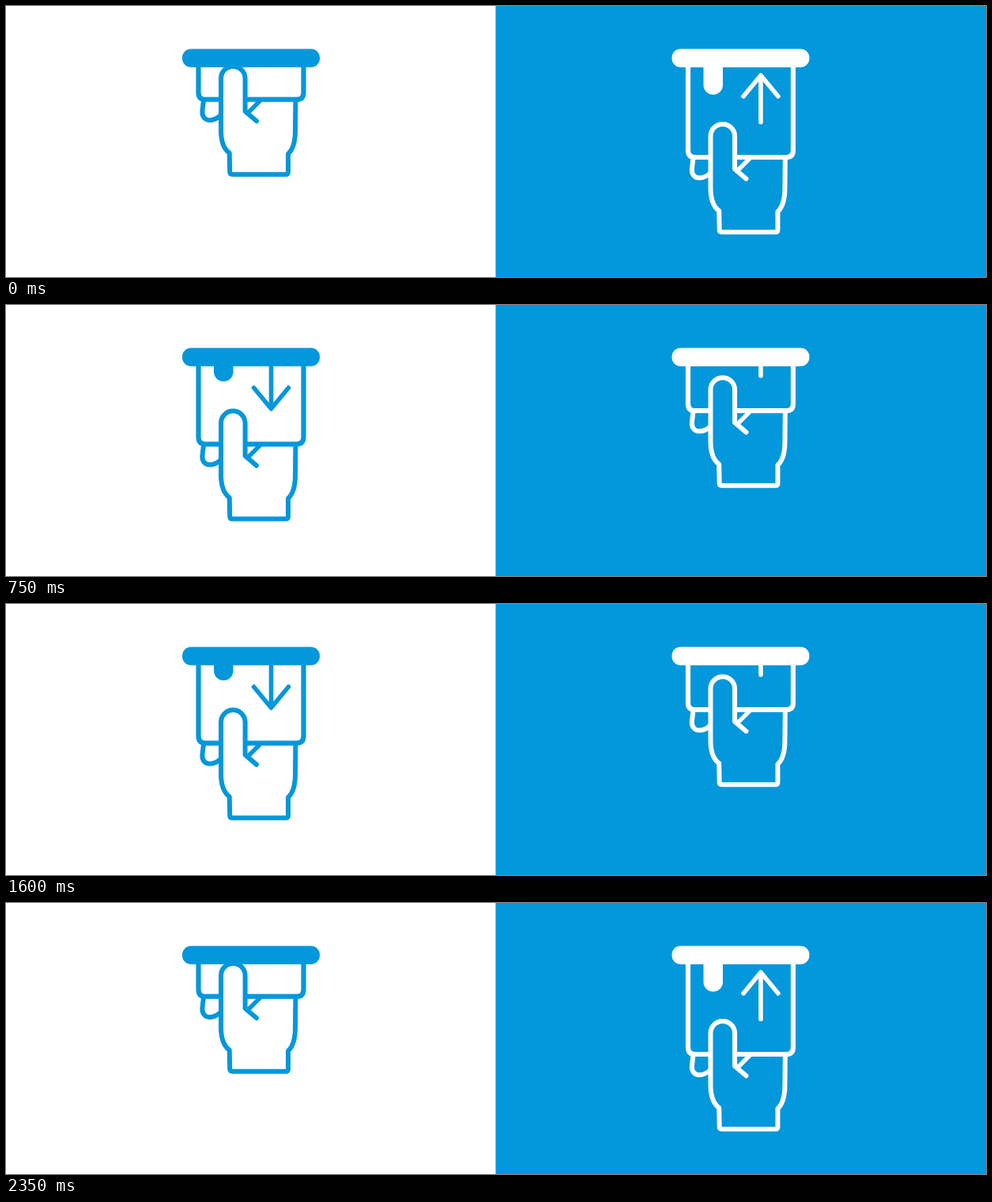
Write an HTML page with a canvas that moves like this. It is 1240 px wide and 344 px high and loops after 2400 ms.

```html
<!DOCTYPE html>
<html lang="en">
<head>
<meta charset="utf-8">
<title>Card slot</title>
<style>
html, body { margin: 0; width: 100%; height: 100%; overflow: hidden; background: #fff; }
canvas { display: block; }
</style>
</head>
<body>
<canvas id="stage" width="1240" height="344"></canvas>
<script>
const ctx = document.getElementById('stage').getContext('2d');
const BLUE = '#0397db', WHITE = '#fff';
const LOOP = 2400, TICK = 50, STEPS = 19, TRAVEL = 73.3;
const PANEL = 619.5;

function stroke(d, width = 6) {
  ctx.lineWidth = width;
  ctx.stroke(new Path2D(d));
}

function roundBox(x, y, w, h, r) {
  ctx.beginPath();
  ctx.roundRect(x, y, w, h, r);
  ctx.fill();
}

function drawCard(down) {
  stroke('M243.5 -20V183Q243.5 192 252 192H368Q376.5 192 376.5 183V-20', 6.2);
  roundBox(263, -20, 24.5, 132.5, 12.25);
  stroke(down
    ? 'M335.5 87.5V147M313.5 120.5L335.5 147.2L357.5 120.5'
    : 'M335.5 147.5V88M313.5 114.7L335.5 88L357.5 114.7', 5.6);
}

function drawHand(back) {
  // index fingertip behind the card
  stroke('M250 193L248.4 207C248 214 252 218.2 257.5 218.2C263 218.2 267 216.5 271 212.5');
  stroke('M321 194L305.5 209.5', 5.5);

  // thumb hides the card
  ctx.fillStyle = back;
  ctx.fill(new Path2D('M272 215V165.3A15.3 15.3 0 0 1 302.6 165.3V207L290 215Z'));
  stroke('M317 219.3L302.6 207V165.3A15.3 15.3 0 0 0 272 165.3V231' +
    'C272 245 276 255 282.7 260L283.2 284Q283.3 287 286.3 287' +
    'H354Q357 287 357 284V261C363 255.5 366 245 366 231L366.4 193');
}

function drawScene(x, ink, back, shift, down) {
  ctx.save();
  ctx.translate(x, 0);
  ctx.strokeStyle = ctx.fillStyle = ink;
  ctx.lineCap = ctx.lineJoin = 'round';
  roundBox(223, 54.5, 174, 23.3, 11.2);
  ctx.beginPath();
  ctx.rect(0, 66, 620, 278);
  ctx.clip();
  ctx.translate(0, shift - TRAVEL);
  drawCard(down);
  drawHand(back);
  ctx.restore();
}

// progress of the left hand: 0 pushed in, 1 pulled out
function pull(t) {
  const tick = Math.floor((t % LOOP) / TICK);
  const ramp = n => Math.min(Math.max(n, 0), STEPS) / STEPS;
  return ramp(tick) - ramp(tick - 28);
}

function frame() {
  const p = pull(performance.now());
  ctx.fillStyle = WHITE;
  ctx.fillRect(0, 0, 1240, 344);
  ctx.fillStyle = BLUE;
  ctx.fillRect(PANEL, 0, 1240 - PANEL, 344);
  drawScene(0, BLUE, WHITE, p * TRAVEL, true);
  drawScene(PANEL, WHITE, BLUE, (1 - p) * TRAVEL, false);
  requestAnimationFrame(frame);
}
frame();
</script>
</body>
</html>
```
